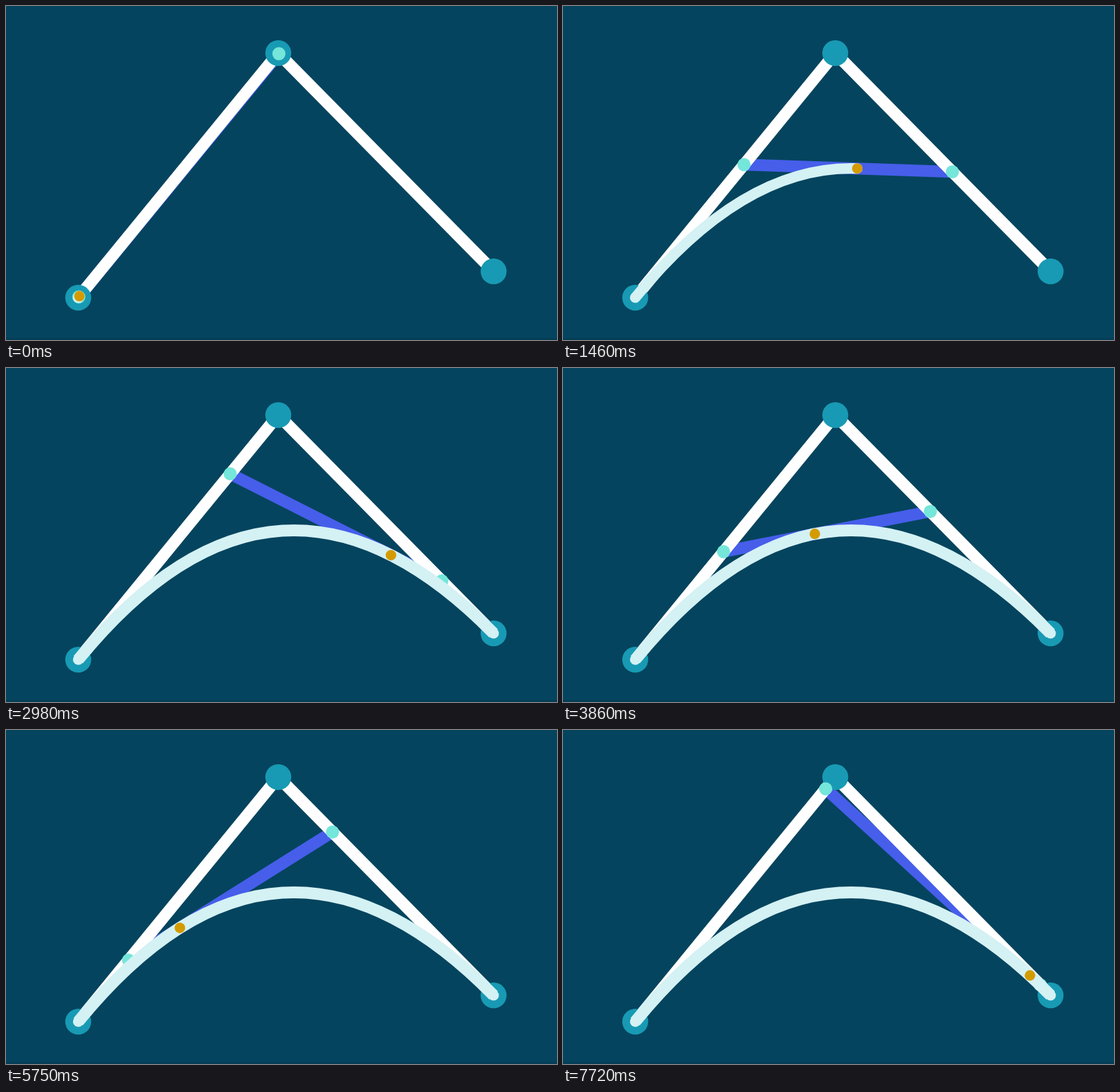
An HTML page with a canvas that plays this animation: 837x508 px, repeating every 7.82 s.

```html
<!DOCTYPE html>
<html lang="en">
<head>
<meta charset="utf-8">
<title>Quadratic curve construction</title>
<style>
  html, body { margin: 0; width: 100%; height: 100%; overflow: hidden; background: #05445e; }
  canvas { display: block; }
</style>
</head>
<body>
<canvas width="837" height="508"></canvas>
<script>
const ctx = document.querySelector('canvas').getContext('2d');
const LOOP = 7820;
const START = [109.7, 443.6], APEX = [413.6, 71.6], END = [740.7, 403.6];
const TOP_TIME = 2316;

// [ms, curve parameter]
const KEYS = [[0, .003], [310, .003], [440, .02], [575, .071],
  [TOP_TIME, 1], [5063, .007], [7720, .952], [LOOP, .952]];

const mix = (a, b, t) => a + (b - a) * t;
const between = (p, q, t) => [mix(p[0], q[0], t), mix(p[1], q[1], t)];

function parameterAt(ms) {
  const i = KEYS.findIndex(key => key[0] > ms);
  const [t0, v0] = KEYS[i - 1], [t1, v1] = KEYS[i];
  return mix(v0, v1, (ms - t0) / (t1 - t0));
}

function dot([x, y], radius, color) {
  ctx.fillStyle = color;
  ctx.beginPath();
  ctx.arc(x, y, radius, 0, 2 * Math.PI);
  ctx.fill();
}

function stroke(color, width, cap, trace) {
  ctx.strokeStyle = color;
  ctx.lineWidth = width;
  ctx.lineCap = cap;
  ctx.beginPath();
  trace();
  ctx.stroke();
}

function line(p, q, color) {
  stroke(color, 18, 'butt', () => { ctx.moveTo(...p); ctx.lineTo(...q); });
}

function curve(control, end, width, cap) {
  stroke('#d4f1f4', width, cap, () => {
    ctx.moveTo(...START);
    ctx.quadraticCurveTo(...control, ...end);
  });
}

function draw(now) {
  const ms = now % LOOP;
  const t = parameterAt(ms);
  const left = between(START, APEX, t);
  const right = between(APEX, END, t);
  const tip = between(left, right, t);

  ctx.fillStyle = '#05445e';
  ctx.fillRect(0, 0, 837, 508);
  ctx.fillStyle = '#043d56';
  ctx.fillRect(0, 505, 837, 3);

  line(left, right, '#465eea');
  line(START, APEX, '#fff');
  line(APEX, END, '#fff');
  for (const p of [START, APEX, END]) dot(p, 19.7, '#189ab4');
  dot(left, 10, '#75e6da');
  dot(right, 10, '#75e6da');

  if (ms < TOP_TIME) {
    curve(left, tip, 16, 'round');
  } else {
    curve(APEX, END, 16, 'round');
    curve(APEX, END, 18, 'butt');
  }
  dot(tip, 8, '#d49b00');
  requestAnimationFrame(() => draw(performance.now()));
}
draw(0);
</script>
</body>
</html>
```
